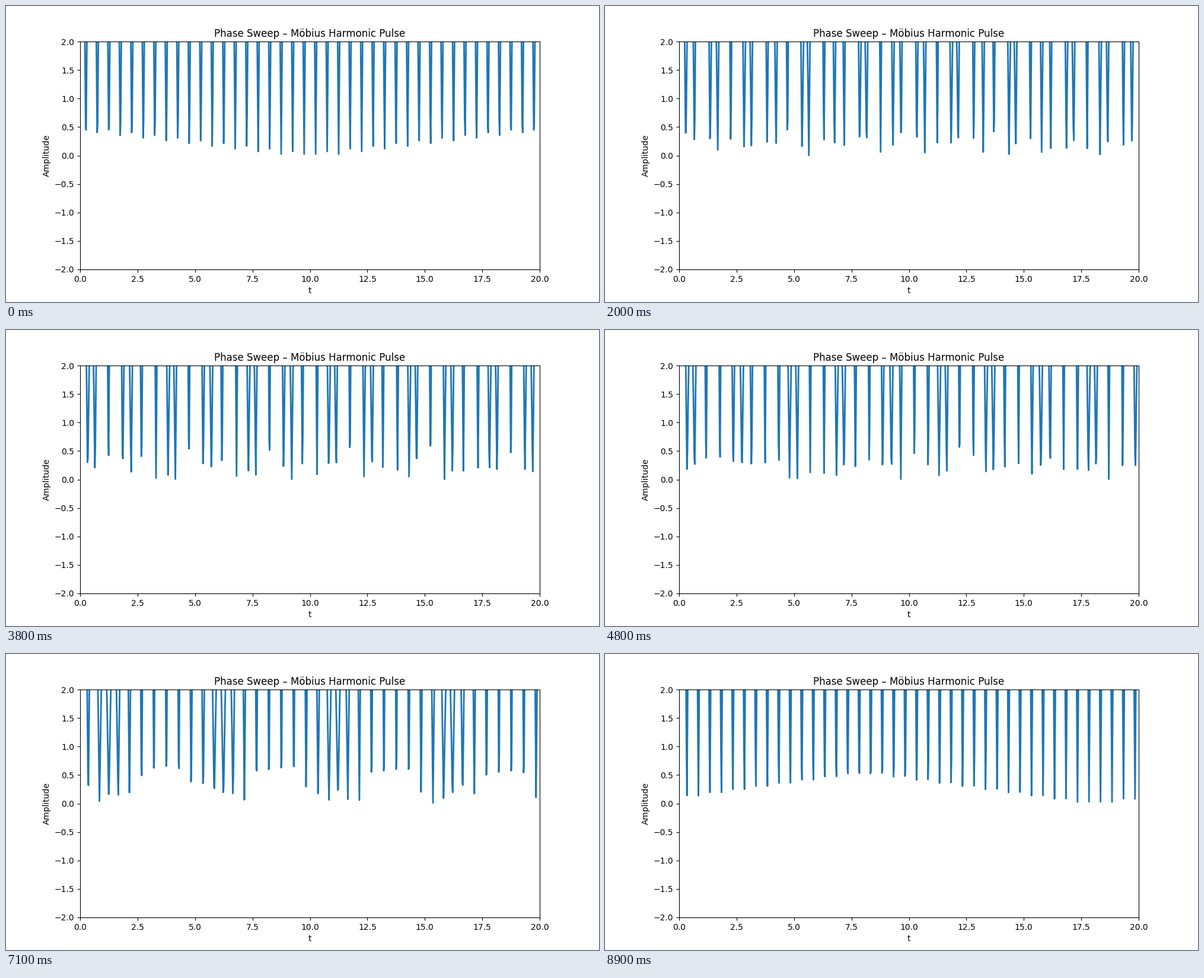
A matplotlib script that plays this animation: 1000 px wide and 500 px high, repeating every 9 s.

```python
import numpy as np
import matplotlib.pyplot as plt
from matplotlib.animation import FuncAnimation

FRAMES = 90
GOLDEN = (1 + 5 ** 0.5) / 2
GAIN = 7.55
RIPPLE = 0.0047

t = np.linspace(0, 20, 1000)
phases = np.linspace(0, 2 * np.pi, FRAMES)


def pulse(phase):
    wave = np.cos(2 * np.pi * t) + np.sin(phase * t) / GOLDEN
    return GAIN * np.abs(wave + RIPPLE * np.cos(2 * phase * t))


fig, ax = plt.subplots(figsize=(10, 5), dpi=100)
line, = ax.plot(t, pulse(0), lw=2)
ax.set_xlim(0, 20)
ax.set_ylim(-2, 2)
ax.set_title("Phase Sweep – Möbius Harmonic Pulse")
ax.set_xlabel("t")
ax.set_ylabel("Amplitude")


def update(i):
    line.set_ydata(pulse(phases[i]))
    return line,


anim = FuncAnimation(fig, update, frames=FRAMES, interval=100,
                     repeat=True, repeat_delay=0)
plt.show()
```
